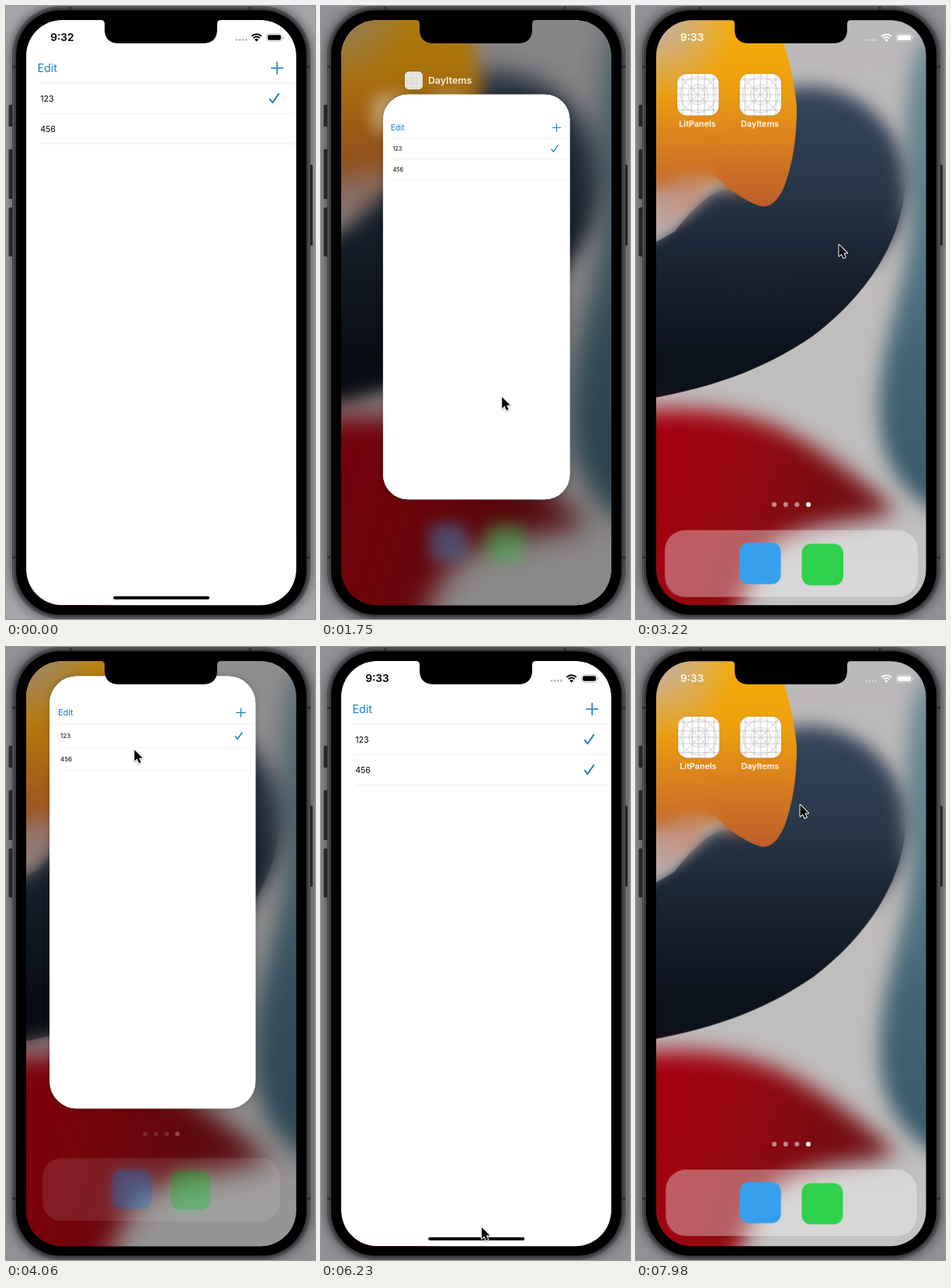
Write an HTML page with a canvas that moves like this. It is 398 px wide and 788 px high and loops after 8 s.

```html
<!DOCTYPE html>
<html lang="en">
<head>
<meta charset="utf-8">
<title>Phone demo</title>
<style>
html, body { margin: 0; width: 100%; height: 100%; overflow: hidden; background: #8b8d90; }
canvas { display: block; }
</style>
</head>
<body>
<canvas id="stage" width="398" height="788"></canvas>
<script>
const W = 398, H = 788, LOOP = 8000;
const SCREEN = { x: 26, y: 18.3, w: 347.6, h: 752, r: 46 };
const MID = { x: 200, y: 394 };
const FONT = 'Inter, Roboto, sans-serif';
const BLUE = '#1c7ec4';
const APPS = ['LitPanels', 'DayItems'];
const ctx = document.getElementById('stage').getContext('2d');

// Each pass drags the app into the switcher, then flicks its card away
const PASSES = [
  { grab: 600, held: 1600, flick: 2060 },
  { grab: 6480, held: 7210, flick: 7260 }
];
const LAUNCH = 3800, TICK = 5600;
const SWITCHER = .692, HOME_ZOOM = .085;

const lerp = (a, b, k) => a + (b - a) * k;
const clamp = v => Math.max(0, Math.min(1, v));
const smooth = u => u * u * (3 - 2 * u);
const pull = u => u ** 2.6;
const passAt = t => PASSES[t < LAUNCH ? 0 : 1];

function spring(ms) {
  const u = ms * .0097;
  return ms < 0 ? 0 : 1 - (1 + u) * Math.exp(-u);
}

// Stops of the pointer: time, place and easing towards it
const POINTER = [
  { t: 210, x: 206, y: 804 },
  { t: 420, x: 207, y: 763 },
  { t: PASSES[0].grab, x: 207, y: 762 },
  { t: PASSES[0].held, x: 215, y: 490, ease: pull },
  { t: PASSES[0].flick, x: 285, y: 540 },
  { t: 2450, x: 330, y: 203 },
  { t: 3220, x: 261, y: 307 },
  { t: 3740, x: 160, y: 117 },
  { t: LAUNCH + 60, x: 160, y: 117 },
  { t: 4550, x: 184, y: 191 },
  { t: TICK, x: 188, y: 176 },
  { t: 6300, x: 207, y: 762 },
  { t: PASSES[1].grab, x: 207, y: 762 },
  { t: PASSES[1].held, x: 256, y: 575, ease: pull },
  { t: PASSES[1].flick, x: 256, y: 575 },
  { t: 7700, x: 211, y: 203 }
];
const PRESSES = [
  ...PASSES.flatMap(p => [[p.grab - 40, p.held - 40], [p.flick, p.flick + 330]]),
  ...[LAUNCH, TICK].map(tap => [tap - 100, tap])
];

function pointerAt(t) {
  const i = POINTER.findIndex(p => p.t > t);
  if (i === 0) return null;
  if (i < 0) return POINTER[POINTER.length - 1];
  const a = POINTER[i - 1], b = POINTER[i];
  const k = (b.ease || smooth)((t - a.t) / (b.t - a.t));
  return { x: lerp(a.x, b.x, k), y: lerp(a.y, b.y, k) };
}

function cardAt(t) {
  const { grab, held, flick } = passAt(t);
  const opening = t >= LAUNCH && t < grab;
  const rise = .00215 * Math.max(0, t - flick) ** 2;
  if (rise > 660) return null;

  let cx = MID.x, cy = MID.y, w = SCREEN.w, h = SCREEN.h, k = 0;
  if (opening) {
    const e = spring(t - LAUNCH);
    cx = lerp(160, cx, e);
    cy = lerp(114, cy, e);
    w = lerp(54, w, e);
    h = lerp(54, h, e);
  } else {
    k = pull(clamp((t - grab) / (held - grab)));
    if (t > grab) {
      const drift = .3 * (pointerAt(Math.min(t, held)).x - 207);
      cx += drift * Math.exp(-Math.max(0, t - held) / 60);
    }
    cy -= 20 * k + 25 * k * (1 - k) + rise;
    w *= lerp(1, SWITCHER, k);
    h *= lerp(1, SWITCHER, k);
  }
  return {
    x: cx - w / 2, y: cy - h / 2, w, h, s: w / SCREEN.w,
    r: Math.max(12, SCREEN.r * w / SCREEN.w),
    alpha: opening ? clamp((t - LAUNCH) / 110) : 1,
    label: clamp((k - .75) * 3.6),
    bar: 1 - clamp((t - held) / 150)
  };
}

// Blur of the home screen and how far its icons sit back
function homeState(t) {
  const { flick } = passAt(t);
  if (t >= LAUNCH && t < PASSES[1].grab) {
    const e = spring(t - LAUNCH);
    return { haze: e, zoom: 1 - HOME_ZOOM * e };
  }
  const ms = t - flick;
  return {
    haze: 1 - smooth(clamp((ms - 350) / 350)),
    zoom: 1 - HOME_ZOOM * Math.exp(-.005 * Math.max(0, ms - 250))
  };
}

function layer(draw) {
  const c = document.createElement('canvas');
  c.width = W;
  c.height = H;
  draw(c.getContext('2d'));
  return c;
}

function box(g, x, y, w, h, r, fill) {
  g.beginPath();
  g.roundRect(x, y, w, h, r);
  if (fill) {
    g.fillStyle = fill;
    g.fill();
  }
}

function dot(g, x, y, r, fill) {
  g.beginPath();
  g.arc(x, y, r, 0, 7);
  g.fillStyle = fill;
  g.fill();
}

function line(g, pts, color, width) {
  g.beginPath();
  pts.forEach(([x, y], i) => i ? g.lineTo(x, y) : g.moveTo(x, y));
  g.strokeStyle = color;
  g.lineWidth = width;
  g.stroke();
}

function text(g, str, x, y, size, color, weight = 400, align = 'left') {
  g.font = `${weight} ${size}px ${FONT}`;
  g.textAlign = align;
  g.fillStyle = color;
  g.fillText(str, x, y);
}

function ramp(g, x0, y0, x1, y1, ...colors) {
  const r = g.createLinearGradient(x0, y0, x1, y1);
  colors.forEach((c, i) => r.addColorStop(i / (colors.length - 1), c));
  return r;
}

function shape(g, path, fill, blur) {
  g.filter = `blur(${blur}px)`;
  g.fillStyle = fill;
  g.fill(new Path2D(path));
  g.filter = 'none';
}

// Outline that turns from blurred to crisp between two points
function focus(g, path, fill, blur, ...span) {
  const part = (px, ...mask) => layer(p => {
    shape(p, path, fill, px);
    p.globalCompositeOperation = 'destination-in';
    p.fillStyle = ramp(p, ...span, ...mask);
    p.fillRect(0, 0, W, H);
  });
  g.drawImage(part(blur, '#000', '#000', '#0000'), 0, 0);
  g.drawImage(part(.6, '#0000', '#000', '#000'), 0, 0);
}

const wall = layer(g => {
  g.fillStyle = ramp(g, 0, 0, 0, H, '#bcb9ba', '#c0bcbc', '#c0bebe', '#c4c2c2');
  g.fillRect(0, 0, W, H);
  shape(g, 'M430 20L362 50C342 120 345 190 352 260C352 370 314 420 313 520C314 590 345 640 430 670Z',
    ramp(g, 0, 60, 0, 650, '#728c97', '#5c7d8a', '#426576', '#38596a'), 12);
  focus(g, 'M-30 335L50 290Q95 230 130 235L190 108C275 86 351 155 346 235C340 305 298 371 228 424C158 472 82 497 -30 512Z',
    ramp(g, 0, 110, 0, 450, '#35455a', '#2a394c', '#192331', '#0c121c'), 11, 0, 225, 0, 355);
  shape(g, 'M-20 -10L150 0L150 200Q112 212 92 234Q62 290 -30 322Z',
    ramp(g, 90, 185, 35, 290, '#cf7c34', '#c48f78', '#bba8a8'), 8);
  focus(g, 'M60 -10L165 -10Q199 50 207 130Q207 190 191 232Q178 262 159 257Q132 248 102 218Q75 208 45 228L-20 245L-20 80Z',
    ramp(g, 0, 30, 0, 255, '#f5ac06', '#eda00e', '#d87e20', '#bd5f2b'), 9, 85, 0, 145, 0);
  const haze = g.createRadialGradient(30, 20, 0, 30, 20, 100);
  haze.addColorStop(0, 'rgba(190,178,184,.95)');
  haze.addColorStop(1, 'rgba(190,178,184,0)');
  g.fillStyle = haze;
  g.fillRect(0, 0, W, H);
  shape(g, 'M-40 528C60 508 140 520 196 548C252 578 298 614 336 650C280 664 220 664 180 690C150 716 142 760 115 810L-40 810Z',
    ramp(g, 26, 560, 330, 660, '#a6000f', '#980810', '#7c0c10', '#6b1418'), 14);
});

function appIcon(g, x, y, size) {
  g.save();
  g.translate(x, y);
  g.scale(size / 54, size / 54);
  g.shadowColor = 'rgba(0,0,0,.35)';
  g.shadowBlur = 2;
  box(g, 0, 0, 54, 54, 12, '#fdfdfd');
  g.shadowColor = 'transparent';
  g.clip();
  g.strokeStyle = '#bdbdbd';
  g.lineWidth = .7;
  g.beginPath();
  for (const p of [7, 18.5, 27, 35.5, 47]) {
    g.moveTo(p, 0);
    g.lineTo(p, 54);
    g.moveTo(0, p);
    g.lineTo(54, p);
  }
  g.moveTo(0, 0);
  g.lineTo(54, 54);
  g.moveTo(54, 0);
  g.lineTo(0, 54);
  for (const r of [9, 13, 23]) {
    g.moveTo(27 + r, 27);
    g.arc(27, 27, r, 0, 7);
  }
  g.stroke();
  g.restore();
}

const tiles = layer(g => {
  APPS.forEach((name, i) => appIcon(g, 53 + i * 80.5, 87, 53.5));
  ['#36a0ec', '#2fd04c'].forEach((color, i) =>
    box(g, 133 + i * 80.5, 690 + i * 1.5, 53.5, 53.5, 12, color));
});
const icons = layer(g => {
  box(g, 37, 674, 326, 86, 26, 'rgba(255,255,255,.35)');
  g.drawImage(tiles, 0, 0);
  APPS.forEach((name, i) =>
    text(g, name, 79 + i * 80.5, 155, 10.8, '#fff', 600, 'center'));
  for (let i = 0; i < 4; i++)
    dot(g, 178 + i * 14.7, 641, 3.1, i === 3 ? '#fff' : 'rgba(255,255,255,.5)');
});

const soft = (src, px) => layer(g => {
  g.filter = `blur(${px}px)`;
  g.drawImage(src, 0, 0);
});
const wallSoft = soft(wall, 10);
const tilesSoft = soft(tiles, 10);

function status(g, clock, color, alpha, faint) {
  if (alpha <= 0) return;
  g.save();
  g.globalAlpha *= alpha;
  text(g, clock, 57, 45.4, 13.7, color, 600);
  for (let i = 0; i < 4; i++) dot(g, 296.8 + i * 4.1, 43.8, 1.4, faint);
  // Wi-Fi
  g.strokeStyle = color;
  g.lineWidth = 2;
  for (const r of [9, 5.6]) {
    g.beginPath();
    g.arc(322.5, 45.5, r, -Math.PI * .75, -Math.PI * .25);
    g.stroke();
  }
  g.beginPath();
  g.moveTo(322.5, 46);
  g.arc(322.5, 46, 3.4, -Math.PI * .75, -Math.PI * .25);
  g.fillStyle = color;
  g.fill();
  // Battery
  box(g, 335.4, 36, 20, 9.6, 3);
  g.strokeStyle = faint;
  g.lineWidth = .9;
  g.stroke();
  box(g, 336.9, 37.5, 17, 6.6, 1.7, color);
  box(g, 356.4, 39.3, 1.1, 3, .6, faint);
  g.restore();
}

function scaled(g, src, k, alpha) {
  if (alpha <= 0) return;
  g.save();
  g.globalAlpha = alpha;
  g.translate(MID.x, MID.y);
  g.scale(k, k);
  g.drawImage(src, -MID.x, -MID.y);
  g.restore();
}

function home(g, t, card) {
  const { haze, zoom } = homeState(t);
  const wallZoom = 1 + (1 - zoom) * .8;
  scaled(g, wall, wallZoom, 1);
  scaled(g, wallSoft, wallZoom, haze);
  const extra = card ? clamp((card.s - .72) * .75) : 0;
  g.fillStyle = `rgba(0,0,0,${haze * (.29 + extra)})`;
  g.fillRect(0, 0, W, H);
  scaled(g, tilesSoft, zoom, haze * .4);
  scaled(g, icons, zoom, 1 - haze);
  status(g, '9:33', '#fff', 1 - haze - (1 - zoom) * 12, 'rgba(255,255,255,.45)');
}

function check(g, y) {
  g.lineCap = g.lineJoin = 'round';
  line(g, [[339.6, y + 1], [343.3, y + 5.6], [351, y - 5.8]], BLUE, 1.9);
  g.lineCap = 'butt';
}

function homeBar(g, s) {
  const base = clamp((1 - s) * 3.3) * 205;
  const shine = Math.min(215, base + clamp((1 - s) * 150) * 75);
  const tone = n => `rgb(${n},${n},${n})`;
  box(g, 138, 759, 124, 4, 2, ramp(g, 138, 0, 262, 0, tone(base), tone(shine), tone(base)));
}

function todo(g, t, c) {
  g.fillStyle = '#fff';
  g.fillRect(0, 0, W, H);
  status(g, t < 210 ? '9:32' : '9:33', '#000', 1 - (1 - c.s) * 9.5, '#b9b9b9');
  text(g, 'Edit', 40.2, 85.2, 14.4, BLUE);
  line(g, [[341, 80], [357, 80]], BLUE, 1.6);
  line(g, [[349, 72], [349, 88]], BLUE, 1.6);
  line(g, [[42, 99.5], [374, 99.5]], '#ebebec', 1);
  ['123', '456'].forEach((label, i) => {
    const y = 119 + i * 39;
    text(g, label, 44, y + 4, 10.6, '#000');
    if (i === 0 || t >= TICK) check(g, y);
    line(g, [[44, y + 19.5], [374, y + 19.5]], '#eeeeef', 1);
  });
  g.globalAlpha *= c.bar;
  homeBar(g, c.s);
}

function app(g, t, c) {
  g.save();
  g.globalAlpha = c.alpha;
  g.save();
  g.shadowColor = 'rgba(0,0,0,.25)';
  g.shadowBlur = 8;
  box(g, c.x, c.y, c.w, c.h, c.r, '#fff');
  g.restore();
  g.clip();
  g.translate(c.x, c.y);
  g.scale(c.s, c.s);
  g.translate(-SCREEN.x, -SCREEN.y);
  todo(g, t, c);
  g.restore();
  g.save();
  g.globalAlpha = c.label;
  appIcon(g, c.x + 28, c.y - 29.5, 23);
  text(g, APPS[1], c.x + 58, c.y - 13.5, 12.4, '#fff', 600);
  g.restore();
}

function body(g, t) {
  g.fillStyle = t < 560 ? '#a5a7aa' : '#909296';
  g.fillRect(0, 0, W, H);
  for (const [y, h] of [[127, 28], [184, 64], [259, 63]]) box(g, 3.5, y, 6, h, 1.5, '#303336');
  box(g, 390, 204, 5, 104, 1.5, '#303336');
  g.save();
  g.shadowColor = 'rgba(0,0,0,.6)';
  g.shadowBlur = 16;
  box(g, 8, .5, 384, 787, 62, '#3a3c3f');
  g.restore();
  box(g, 9.5, 2, 381, 784, 60);
  g.strokeStyle = '#55575a';
  g.lineWidth = 1.6;
  g.stroke();
  for (const y of [78, 709])
    for (const x of [8, 387]) line(g, [[x, y], [x + 5, y]], '#2a2c2e', 3);
  for (const x of [83, 314]) line(g, [[x, 1], [x, 6]], '#2a2c2e', 3);
  box(g, 13, 5.5, 374, 777, 57, '#000');
}

function notch(g) {
  g.fillStyle = '#000';
  g.fill(new Path2D('M122 17L277 17L277 18Q272 18 272 23L272 30Q272 48 253 48L146 48Q127 48 127 30L127 23Q127 18 122 18Z'));
}

function pointer(g, t) {
  const p = pointerAt(t);
  if (!p) return;
  if (PRESSES.some(([from, to]) => t >= from && t < to)) {
    g.beginPath();
    g.arc(p.x, p.y + 1, 21.5, 0, 7);
    g.strokeStyle = '#000';
    g.lineWidth = 1.6;
    g.stroke();
  }
  g.save();
  g.translate(p.x, p.y);
  g.shadowColor = 'rgba(0,0,0,.35)';
  g.shadowBlur = 2;
  g.shadowOffsetY = 1;
  const arrow = new Path2D('M.5 0L.5 14.6L3.9 11.4L6.3 17L8.8 15.9L6.4 10.5L11 10.5Z');
  g.lineJoin = 'round';
  g.lineWidth = 2;
  g.strokeStyle = '#fff';
  g.stroke(arrow);
  g.shadowColor = 'transparent';
  g.fillStyle = '#000';
  g.fill(arrow);
  g.restore();
}

function render(t) {
  const card = cardAt(t);
  body(ctx, t);
  ctx.save();
  box(ctx, SCREEN.x, SCREEN.y, SCREEN.w, SCREEN.h, SCREEN.r);
  ctx.clip();
  home(ctx, t, card);
  if (card) app(ctx, t, card);
  ctx.restore();
  notch(ctx);
  pointer(ctx, t);
}

const start = performance.now();
function tick() {
  render((performance.now() - start) % LOOP);
  requestAnimationFrame(tick);
}
tick();
</script>
</body>
</html>
```
